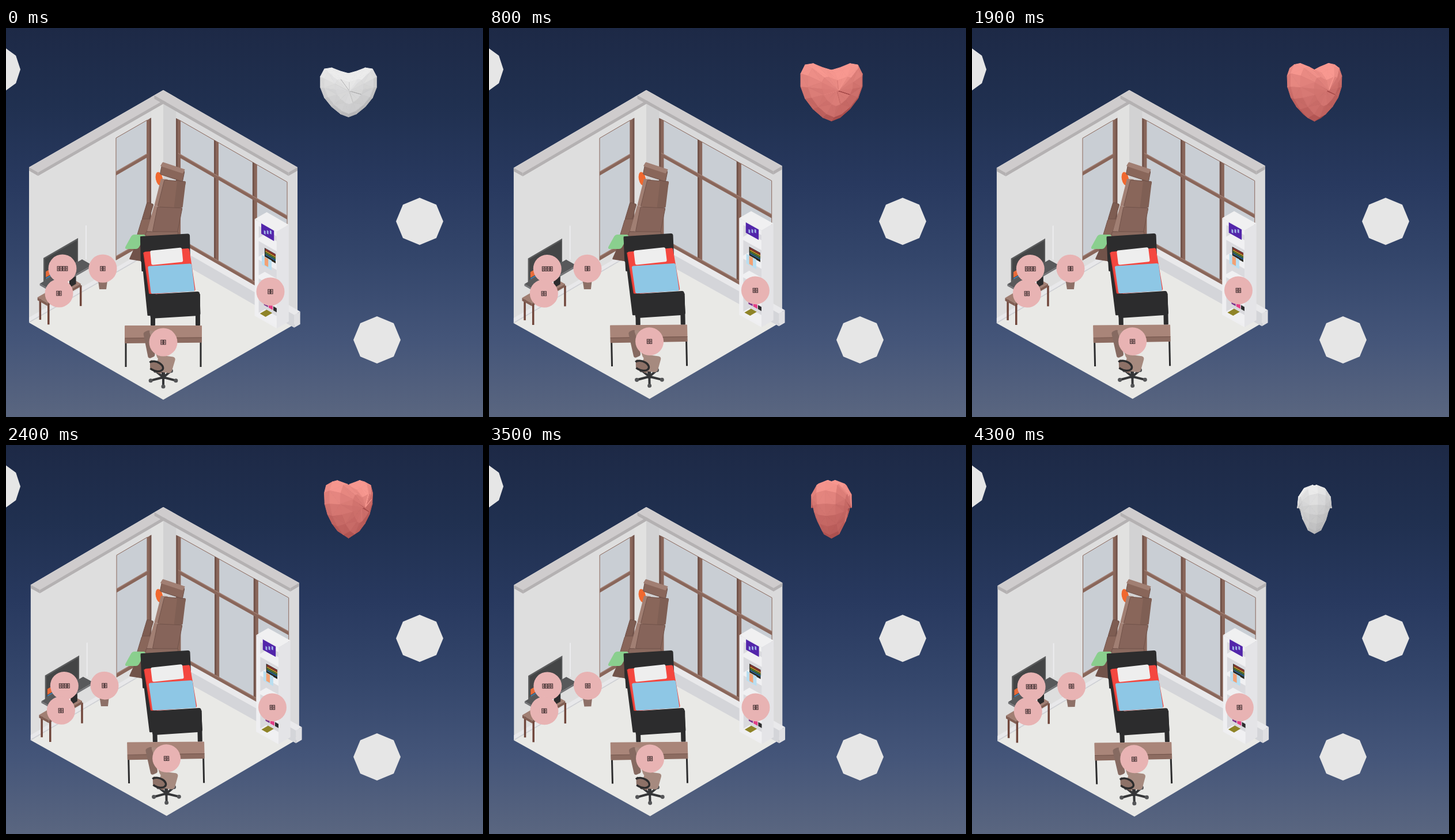
Recreate the animation shown at these times as an HTML page with a canvas. Size 828 by 676 pixels, loop 4.4 s.

```html
<!DOCTYPE html>
<html lang="en">
<head>
<meta charset="utf-8">
<title>Isometric room</title>
<style>
html, body { margin: 0; width: 100%; height: 100%; overflow: hidden; background: #1e2b49; }
canvas { display: block; }
</style>
</head>
<body>
<canvas id="stage" width="828" height="676"></canvas>
<script>
const ctx = document.getElementById('stage').getContext('2d');
const LOOP = 4400, STEP = 100, TAU = Math.PI * 2;
const BROWN = '#89665a', DARK = '#71534a', LIGHT = '#a17f73', GLASS = '#c9ced4', BLACK = '#2c2c2d';

// Room space: a runs along the left wall, b along the right wall (both 0..1), h is up in pixels.
const CORNER_X = 273, FLOOR_Y = 378, SIDE = 233, PITCH = .575, WALL = 270, FLOOR_SPAN = 268;
let turn = 0, lift = 0;

function moveCamera(t) {
  const settle = 1 - Math.exp(-t / 180);
  const late = Math.max(0, (t - 2600) / 1800) ** 2;
  turn = (5.7 * settle + 3.5 * late) / 460;
  lift = 1.4 * settle * (1 - late) / FLOOR_SPAN;
}
function project(a, b, h) {
  const x = (b - a) * SIDE, z = (a + b) * SIDE;
  return [CORNER_X + x + turn * z, FLOOR_Y + (z - turn * x) * PITCH * (1 - lift) - h];
}
// Moves things drawn in screen coordinates as if they lay in a level plane at this height.
function level(height, draw) {
  const y0 = FLOOR_Y - height;
  ctx.save();
  ctx.transform(1, -turn * PITCH, turn / PITCH, 1 - lift,
    -turn / PITCH * y0, turn * PITCH * CORNER_X + lift * y0);
  draw();
  ctx.restore();
}

function poly(color, points, edge) {
  ctx.beginPath();
  points.forEach(p => ctx.lineTo(p[0], p[1]));
  ctx.closePath();
  ctx.fillStyle = color;
  ctx.fill();
  if (edge) { ctx.strokeStyle = edge; ctx.lineWidth = 1; ctx.stroke(); }
}
function line(color, width, from, to) {
  ctx.beginPath();
  ctx.moveTo(...from);
  ctx.lineTo(...to);
  ctx.strokeStyle = color;
  ctx.lineWidth = width;
  ctx.stroke();
}
function oval(color, x, y, rx, ry = rx, tilt = 0) {
  ctx.beginPath();
  ctx.ellipse(x, y, rx, ry, tilt, 0, TAU);
  ctx.fillStyle = color;
  ctx.fill();
}
// A slanted, slightly rounded rectangle in screen space.
function panel(color, x, y, w, h, slopeY = 0, slopeX = 0, radius = 1, edge) {
  ctx.save();
  ctx.transform(1, slopeY, slopeX, 1, x, y);
  ctx.beginPath();
  ctx.roundRect(0, 0, w, h, radius);
  ctx.fillStyle = color;
  ctx.fill();
  if (edge) { ctx.strokeStyle = edge; ctx.lineWidth = 1; ctx.stroke(); }
  ctx.restore();
}

// Faces parallel to the left wall, the right wall and the floor.
function leftFace(color, a0, a1, h0, h1, b = 0, edge) {
  poly(color, [project(a0, b, h0), project(a1, b, h0), project(a1, b, h1), project(a0, b, h1)], edge);
}
function rightFace(color, b0, b1, h0, h1, a = 0, edge) {
  poly(color, [project(a, b0, h0), project(a, b1, h0), project(a, b1, h1), project(a, b0, h1)], edge);
}
function slab(color, a0, a1, b0, b1, h) {
  poly(color, [project(a0, b0, h), project(a1, b0, h), project(a1, b1, h), project(a0, b1, h)]);
}
function box([top, front, side], a0, a1, b0, b1, h0, h1) {
  slab(top, a0, a1, b0, b1, h1);
  rightFace(front, b0, b1, h0, h1, a1);
  leftFace(side, a0, a1, h0, h1, b1);
}

function backdrop() {
  const sky = ctx.createLinearGradient(0, 0, 0, 676);
  ['#1d2946', '#203050', '#28395f', '#34466b', '#445579', '#5a6680']
    .forEach((c, i) => sky.addColorStop(i / 5, c));
  ctx.fillStyle = sky;
  ctx.fillRect(0, 0, 828, 676);
  for (const [x, y, sides] of [[-16, 72, 10], [718, 336, 8], [644, 542, 8]]) {
    const corner = (_, i) => [x + 41 * Math.cos(i * TAU / sides), y + 41 * Math.sin(i * TAU / sides)];
    poly('#e6e6e6', Array.from({ length: sides }, corner));
  }
}

// Glass from "start" to "end" with a cross bar, a sill and upright posts.
function windowOn(face, start, end, posts) {
  face(GLASS, start, end, 22, 234, 0, BROWN);
  for (const p of posts) {
    face(BROWN, p, p + .034, 22, 234);
    face(DARK, p, p + .012, 22, 234);
  }
  for (const h of [22, 169]) {
    face(BROWN, start, end, h, h + 7);
    face(LIGHT, start, end, h + 5.5, h + 7);
  }
}

function room() {
  slab('#e9e9e6', 0, 1, 0, 1, 0);
  leftFace('#dedede', 0, 1, 0, WALL);
  leftFace('#e1e1e0', 0, .09, 0, WALL);
  rightFace('#dadadb', 0, 1, 0, WALL);
  rightFace('#d2d2d3', 0, .095, 0, WALL);
  leftFace('#e8e8ea', 0, 1, 0, 9);
  leftFace('#cfd0d4', 0, 1, 0, 1.5);
  windowOn(leftFace, .12, .352, [.09]);
  windowOn(rightFace, .11, .923, [.095, .378, .665]);
  box(['#e9e9eb', '#d4d5d9', '#dfdfe2'], 0, .045, 0, 1.02, 0, 22);
  const rail = ['#cfcccd', '#b4b1b2', '#b4b1b2'];
  box(rail, 0, 1, 0, .067, 264, WALL);
  box(rail, 0, .067, 0, 1, 264, WALL);
}

function recliner() {
  panel('#7e5d52', 245, 303, 11, 30, .3, -.3, 2, DARK);
  panel(BROWN, 236, 332, 15, 28, 0, -.3, 2, DARK);
  panel(DARK, 228, 370, 25, 32, .15, -.45, 2);
  oval('#f0682f', 266, 262, 6, 12, -.2);
  panel(LIGHT, 269, 262, 12, 47, .1, -.25);
  panel(BROWN, 275, 264, 37, 47, .08, -.25, 2, DARK);
  panel('#7f5f54', 297, 267, 15, 45, 0, -.12);
  panel(LIGHT, 257, 309, 10, 44, .1, -.28);
  panel('#86645a', 263, 311, 43, 43, .04, -.2, 2, DARK);
  panel('#8b6a5f', 243, 354, 56, 24, 0, -.1, 2, DARK);
  panel(BROWN, 271, 236, 39, 18, .33, -.2, 2, DARK);
  panel(LIGHT, 272, 233, 39, 7, .33, -.6);
  panel('#8acf8e', 219, 359, 24, 25, 0, -.55, 4);
}

function bed() {
  panel(BLACK, 233, 362, 5, 61, 0, .04);
  panel(BLACK, 233, 362, 86, 46, -.055, .02, 4);
  panel(BLACK, 235, 394, 18, 106, 0, .1);
  panel('#d83a34', 238, 390, 16, 72, 0, .14);
  panel('#f4473f', 239, 389, 79, 74, -.08, .15, 3);
  panel('#eeeeee', 250, 387, 55, 25, -.1, .1, 3);
  panel('#8ec7e5', 246, 414, 76, 48, -.06, .12, 3);
  for (const x of [251, 329]) panel(BLACK, x, 462, 8, 55);
  panel(BLACK, 249, 463, 87, 42, -.06, .04, 4);
}

function tvCorner() {
  const wood = '#70463b', low = .013, high = .085;
  const leg = (a, b) => line(wood, 3.5, project(a, b, 0), project(a, b, 36));
  leg(.7, high);
  leg(.94, low + .01);
  box([LIGHT, '#815e53', '#815e53'], .7, .95, low, high, 34, 39);
  leg(.94, high);
  line('#ececee', 2, project(.575, 0, 53), project(.575, 0, 112));
  box(['#efefef', '#efefef', BLACK], .72, .77, .03, .07, 39, 56);
  box(['#58595b', '#717275', '#717275'], .62, .935, .015, .09, 58, 61);
  leftFace('#5b5c5d', .665, .923, 64, 106, .03);
  leftFace('#444546', .672, .912, 67, 103, .03);
  leftFace('#e76b39', .865, .905, 70, 80, .03);
  leftFace('#4283b7', .86, .905, 67, 69, .03);
}

function bookshelf() {
  const back = .025, front = .115, left = .796, right = .96, top = 168;
  rightFace('#efeff1', left, right, 0, top, front);
  rightFace('#dadade', left + .03, right, 5, top - 8, front);
  for (let i = 0; i < 5; i++) slab('#f0f0f2', back + .025, front, left + .01, right, 4 + i * 32.5);
  rightFace('#5225aa', .83, .925, 145, 163, .1);
  for (let i = 0; i < 3; i++) rightFace('#9fb4e6', .85 + i * .022, .862 + i * .022, 148 + i * 3, 154 + i * 3, .1);
  rightFace('#282922', .855, .937, 108, 124, .1);
  ['#a83432', '#d79a28', '#508a3d', '#2868a2'].forEach((color, i) =>
    rightFace(color, .86, .937, 121 - i * 3, 123 - i * 3, .1));
  rightFace('#b9def0', .834, .907, 92, 109, .1);
  rightFace('#f2a174', .855, .882, 94, 108, .1);
  ['#7b328c', '#e23d85', BLACK].forEach((color, i) =>
    rightFace(color, .85 + i * .035, .88 + i * .035, 24, 31, .1));
  slab('#8f8428', .05, .1, .82, .862, 5);
  leftFace('#e4e4e7', back, front, 0, top, right);
  slab('#f0f0f1', back, front, left, right, top);
}

function pot() {
  poly('#8d7067', [[159, 432], [177, 432], [174, 454], [162, 454]]);
}

function desk() {
  for (const x of [208, 338]) line(BLACK, 3, [x, 540], [x, 589]);
  panel('#a98579', 206, 517, 134, 22);
  panel('#8d6c61', 206, 539, 134, 9, -.01);
  line(DARK, 1, [206, 539], [340, 538]);
}

function officeChair() {
  line('#343436', 6, [273, 597], [273, 610]);
  for (let i = 0; i < 5; i++) {
    const angle = TAU * (.25 + i / 5), x = 273 + 23 * Math.cos(angle), y = 608 + 15 * Math.sin(angle);
    line('#353638', 4, [273, 607], [x, y]);
    oval('#555658', x, y, 3.5);
  }
  panel('#866a61', 238, 529, 12, 46, -.4, .2, 4);
  panel('#a98b80', 248, 525, 15, 50, .2, .3, 4);
  panel('#a68a7f', 266, 568, 29, 28, .15, -.3, 5);
  panel('#8d7167', 250, 576, 20, 18, .4, 0, 4);
  ctx.beginPath();
  ctx.ellipse(260, 588, 13, 8, .35, -2.8, 2.2);
  ctx.strokeStyle = BLACK;
  ctx.lineWidth = 3.5;
  ctx.stroke();
}

// A round label whose missing glyphs show as small boxes.
function badge(x, y, height, glyphs) {
  level(height, () => {
    oval('#e8b3b3', x, y, 24.5);
    ctx.lineWidth = 1;
    ctx.strokeStyle = '#3a2b2c';
    ctx.fillStyle = '#7a5a5b';
    for (let i = 0; i < glyphs; i++) {
      const left = x + (i - glyphs / 2) * 4.7;
      ctx.strokeRect(left + .5, y - 3.7, 3.6, 7.6);
      ctx.fillRect(left + 1.5, y - 2.2, 1.6, 4.6);
    }
  });
}

// Low-poly heart: a heart curve shrunk over latitudes towards two poles.
const SEGMENTS = 18, BANDS = 6, MID_Y = -.04;
function heartPoint(band, segment) {
  const u = segment * TAU / SEGMENTS, v = (band / BANDS - .5) * Math.PI, c = Math.cos(v);
  const x = .59 * Math.sign(Math.sin(u)) * Math.abs(Math.sin(u)) ** 1.2;
  const curve = 13 * Math.cos(u) - 5 * Math.cos(2 * u) - 2 * Math.cos(3 * u) - Math.cos(4 * u);
  const y = (11.9 - curve) / 29 - .5 - .14 * Math.max(0, Math.cos(u)) ** 4;
  return [x * c, MID_Y + (y - MID_Y) * c, .31 * Math.sin(v) * (1 - .3 * y)];
}
const MESH = [];
for (let r = 0; r < BANDS; r++) {
  for (let i = 0; i < SEGMENTS; i++) {
    const [a, b, c, d] = [heartPoint(r, i), heartPoint(r, i + 1), heartPoint(r + 1, i + 1), heartPoint(r + 1, i)];
    MESH.push(...((r + i) % 2 ? [[a, b, c], [a, c, d]] : [[a, b, d], [b, c, d]]));
  }
}

function heart(t) {
  const beat = (t + 80) % 530;              // decays for 350 ms, then swells
  const red = beat >= 350;
  const height = red ? 98.5 + (beat - 350) / 55 : 85.5 - beat / 64;
  const angle = (3 + t * .0218) * Math.PI / 180, cos = Math.cos(angle), sin = Math.sin(angle);
  const [shade, tint] = red ? [[130, 40, 42], [248, 152, 144]] : [[150, 150, 152], [236, 236, 236]];
  const faces = [];
  for (const triangle of MESH) {
    const p = triangle.map(([x, y, z]) => [x * cos + z * sin, y, z * cos - x * sin]);
    const [u, v] = [1, 2].map(k => p[k].map((n, j) => n - p[0][j]));
    const n = [u[1] * v[2] - u[2] * v[1], u[2] * v[0] - u[0] * v[2], u[0] * v[1] - u[1] * v[0]];
    const mid = [0, 1, 2].map(j => (p[0][j] + p[1][j] + p[2][j]) / 3);
    const size = Math.hypot(...n);
    if (size < 1e-6) continue;
    const outward = n[0] * mid[0] + n[1] * (mid[1] - MID_Y) + n[2] * mid[2];
    const [nx, ny, nz] = n.map(c => c / (outward < 0 ? -size : size));
    if (nz <= 0) continue;
    const glow = Math.min(1, Math.max(0, .62 - ny * .38 + nz * .22 - nx * .06));
    faces.push([mid[2], p, shade.map((s, j) => Math.round(s + (tint[j] - s) * glow))]);
  }
  faces.sort((a, b) => a[0] - b[0]);
  for (const [, p, rgb] of faces) {
    poly(`rgb(${rgb})`, p.map(([x, y]) => [594.5 + x * height, 112.8 + y * height]), `rgb(${rgb})`);
  }
}

function render(t) {
  moveCamera(t);
  backdrop();
  room();
  recliner();
  level(40, bed);
  tvCorner();
  level(60, pot);
  bookshelf();
  level(50, desk);
  level(20, officeChair);
  badge(98, 418, 115, 4);
  badge(92, 461, 75, 2);
  badge(168, 418, 100, 2);
  badge(459, 458, 80, 2);
  badge(273, 546, 94, 2);
  heart(t);
}

function frame() {
  const t = performance.now() % LOOP;
  render(Math.floor(t / STEP) * STEP);
  requestAnimationFrame(frame);
}
frame();
</script>
</body>
</html>
```
